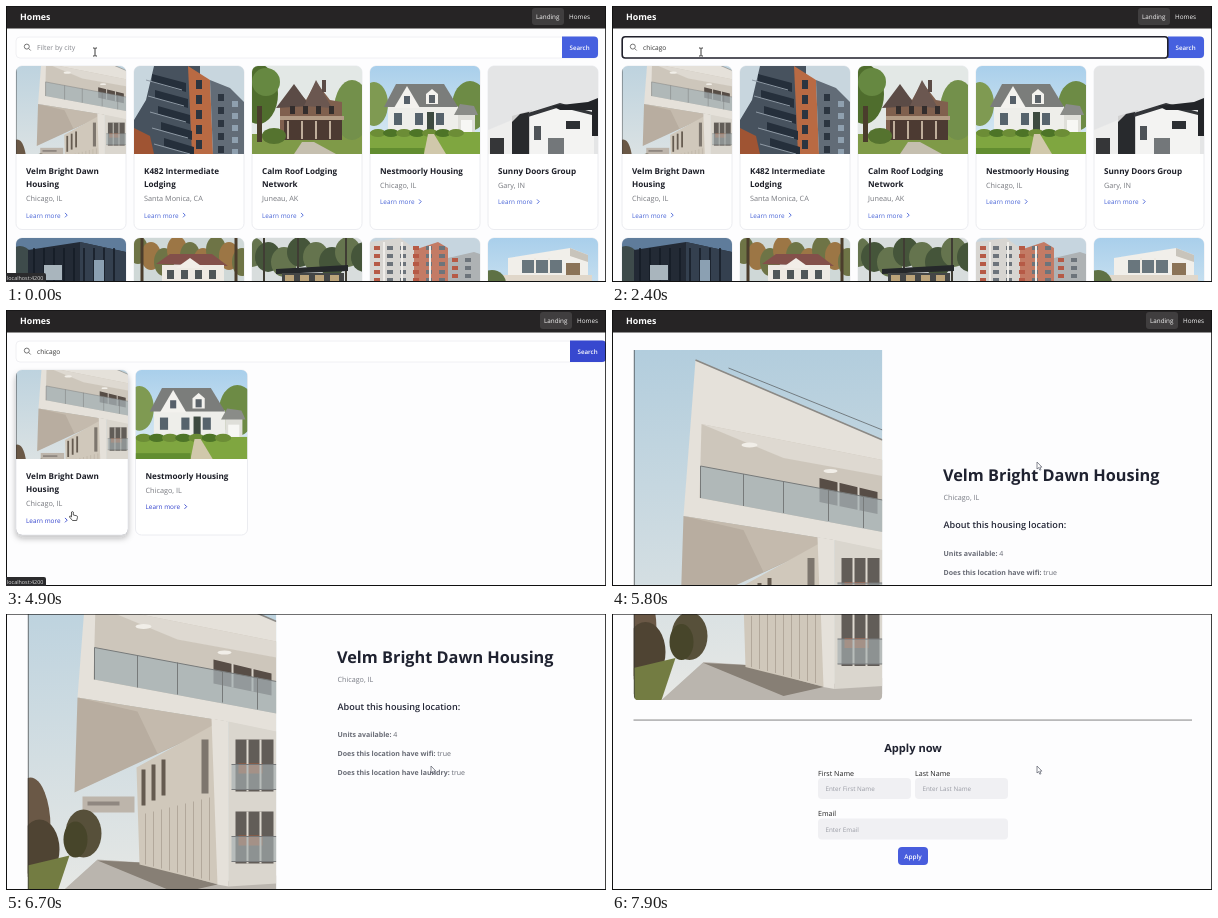
Write an HTML page that moves like this. It is 600 by 276 pixels and loops after 8 s.

```html
<!DOCTYPE html>
<html lang="en">
<head>
<meta charset="utf-8">
<title>Homes</title>
<style>
html, body { margin: 0; width: 100%; height: 100%; overflow: hidden; background: #fdfdfe; }
svg { display: block; }
text { font-family: "Open Sans", "Noto Sans", sans-serif; text-rendering: geometricPrecision; white-space: pre; }

.timed { animation: 8s step-end infinite; }
#list { animation-name: list; }
#results { animation-name: results; }
#detail { animation-name: detail; }
#status { animation-name: status; }
#ring { animation-name: ring; }
#hint { animation-name: hint; }
#beam { animation-name: beam; }
#hand, #lift { animation-name: hand; }
#arrow { animation-name: detail; }
#page { animation: scroll 8s infinite; }
#pointer { animation: pointer 8s infinite; }
.key { fill: transparent; animation: key 8s step-end infinite; animation-delay: calc(var(--i) * .2s); }

@keyframes list { 0% { visibility: visible } 36.25%, 100% { visibility: hidden } }
@keyframes results { 0% { visibility: hidden } 36.25% { visibility: visible } 63.75%, 100% { visibility: hidden } }
@keyframes detail { 0% { visibility: hidden } 63.75%, 100% { visibility: visible } }
@keyframes status {
  0% { visibility: visible } 5% { visibility: hidden }
  48.75% { visibility: visible } 68.75%, 100% { visibility: hidden }
}
@keyframes ring { 0% { opacity: 0 } 6.25%, 100% { opacity: 1 } }
@keyframes hint { 0% { opacity: 1 } 12.5%, 100% { opacity: 0 } }
@keyframes key { 0% { fill: transparent } 12.5% { fill: #333 } 37.5%, 100% { fill: transparent } }
@keyframes beam { 0% { visibility: visible } 38.75%, 100% { visibility: hidden } }
@keyframes hand { 0% { visibility: hidden } 38.75% { visibility: visible } 63.75%, 100% { visibility: hidden } }
@keyframes scroll {
  0% { transform: translateY(0) }
  73.75% { transform: translateY(0); animation-timing-function: steps(4) }
  78.75% { transform: translateY(-64px); animation-timing-function: steps(8) }
  88.75% { transform: translateY(-181px); animation-timing-function: steps(6) }
  96.25%, 100% { transform: translateY(-320px) }
}
@keyframes pointer {
  0% { transform: translate(89px, 46px) }
  37.5% { transform: translate(89px, 46px); animation-timing-function: steps(5) }
  43.75%, 47.5% { transform: translate(63px, 198px); animation-timing-function: steps(4) }
  52.5%, 65% { transform: translate(67px, 206px); animation-timing-function: steps(6) }
  72.5%, 100% { transform: translate(425px, 156px) }
}
</style>
</head>
<body>
<svg id="stage" width="600" height="276" viewBox="0 0 600 276"></svg>
<script>
const rect = (fill, x, y, w, h, rx = 0, more = "") =>
  `<rect x="${x}" y="${y}" width="${w}" height="${h}" rx="${rx}" fill="${fill}" ${more}/>`;
const poly = (fill, points, more = "") => `<polygon points="${points}" fill="${fill}" ${more}/>`;
const oval = (fill, cx, cy, rx, ry) => `<ellipse cx="${cx}" cy="${cy}" rx="${rx}" ry="${ry}" fill="${fill}"/>`;
const line = (stroke, d, w = 1) => `<path d="${d}" fill="none" stroke="${stroke}" stroke-width="${w}"/>`;
const text = (x, y, size, fill, weight, s, more = "") =>
  `<text x="${x}" y="${y}" font-size="${size}" fill="${fill}" font-weight="${weight}" ${more}>${s}</text>`;
const repeat = (n, f) => Array.from({ length: n }, (_, i) => f(i)).join("");
const grad = (id, a, b) => `<linearGradient id="${id}" x2="0" y2="1"><stop stop-color="${a}"/><stop offset="1" stop-color="${b}"/></linearGradient>`;

// Pictures: the first is tall, the others are 110 x 88.
const concrete = () =>
  rect("url(#haze)", 0, 0, 249, 366) +
  poly("#e5e1da", "62,10 249,90 249,210 200,190 50,166") +
  line("#8b8985", "M62 10L249 90", 1.5) + line("#55585a", "M95 18L249 80", .7) +
  poly("#cdc6bb", "68,74 249,110 249,182 66,148") +
  poly("#ded9d1", "68,74 249,110 249,126 150,108") +
  poly("#574d46", "186,128 244,142 244,164 186,152") + line("#d8d2c9", "M205 132V156M225 137V160", 2) +
  poly("#a7b3b7", "67,116 249,150 249,182 67,148", 'opacity=".75"') +
  line("#777a7a", "M67 116L249 150M67 116V148M110 124V156M150 131V163M195 140V171M230 146V178", 1) +
  oval("#f1eee8", 116, 95, 8, 2.5) + oval("#f1eee8", 197, 121, 7, 2) +
  poly("#b8ada0", "50,166 200,190 47,261") +
  poly("#c9c0b3", "50,166 200,190 130,222 110,180", 'opacity=".7"') +
  rect("#bdb5ab", 55, 265, 52, 16) + rect("#8f8780", 60, 270, 32, 4) +
  oval("#57503a", 56, 302, 18, 24) + oval("#47452a", 48, 308, 12, 18) +
  oval("#6a5846", 3, 296, 20, 50) + oval("#4f4433", 12, 318, 20, 30) +
  poly("#737c42", "0,334 42,324 28,366 0,366") +
  poly("#bab5ae", "28,366 70,328 115,331 190,351 249,344 249,366") +
  poly("#877f75", "70,329 112,331 190,353 150,362") +
  poly("#d0c8bb", "109,236 192,190 192,353 112,333") +
  repeat(9, i => line("#aaa093", `M${118 + i * 8} ${282 - i * 2}V${333 + i * 2}`, .8)) +
  repeat(3, i => rect("#655b50", 114 + i * 10, 238 - i * 5, 4, 36)) +
  rect("#7d766e", 174, 208, 7, 54) +
  poly("#e5e1da", "184,187 201,190 201,355 190,353") +
  poly("#dad6ce", "201,190 249,200 249,352 201,355") +
  [208, 280].map(y => rect("#625d58", 208, y, 38, 52) + rect("#a45a39", 211, y + 24, 24, 10) +
    line("#ded9d0", `M220 ${y}v52M233 ${y}v52`, 2) +
    rect("#a5afb1", 204, y + 25, 45, 25, 0, 'opacity=".65"') + line("#77797a", `M204 ${y + 25}h45M204 ${y + 50}h45`)).join("") +
  rect("#333", 0, 0, 1, 366);

const flats = () =>
  rect("#c8d6de", 0, 0, 110, 88) +
  poly("#47525e", "20,0 66,0 66,88 0,88 0,54 12,34") +
  poly("#b96a43", "54,0 76,14 79,88 58,88") +
  poly("#626c77", "76,14 96,22 110,36 110,88 79,88") +
  repeat(5, i => poly("#252f3b", `${18 + i * 3},${8 + i * 16} ${52 + i * 2},${17 + i * 16} ${52 + i * 2},${26 + i * 16} ${18 + i * 3},${16 + i * 16}`) +
    line("#8f9aa5", `M${12 + i * 2} ${14 + i * 16}l36 10`, 1)) +
  repeat(5, i => rect("#2c3540", 62, 14 + i * 15, 6, 9) + rect("#2c3540", 84, 28 + i * 13, 6, 7) + rect("#8fa0af", 98, 35 + i * 12, 6, 6)) +
  poly("#9f5433", "0,62 16,70 20,88 0,88");

const brick = () =>
  rect("#e3e8e6", 0, 0, 110, 88) + rect("#7f9a48", 0, 68, 110, 20) +
  oval("#73904b", 100, 44, 18, 30) +
  poly("#80604e", "28,40 42,22 54,34 64,16 78,34 90,36 90,74 28,74") +
  poly("#5b4b46", "24,42 42,18 58,40") + poly("#6b5750", "52,40 64,14 80,42") +
  rect("#5b4b46", 70, 14, 4, 12) + rect("#4c3a32", 32, 54, 58, 20) + rect("#b39c86", 28, 50, 64, 4) +
  repeat(4, i => rect("#bfae9b", 35 + i * 14, 55, 2, 18) + rect("#332d2c", 38 + i * 13, 40, 5, 8)) +
  poly("#c5bfaf", "50,76 62,76 84,88 42,88") +
  oval("#4f6d2d", 6, 28, 20, 30) + oval("#668841", 14, 16, 14, 14) + rect("#4a3d2c", 5, 40, 5, 36) + oval("#55732f", 22, 70, 12, 8);

const cottage = () =>
  rect("url(#clear)", 0, 0, 110, 88) + oval("#6d8b45", 100, 40, 18, 25) + oval("#7f9a52", 4, 38, 14, 22) +
  rect("#7fa640", 0, 66, 110, 22) +
  rect("#eeeeea", 18, 40, 70, 28) + poly("#7b7d7b", "14,41 26,18 74,18 88,41") +
  poly("#f3f2ee", "24,42 37,20 50,42") + poly("#f3f2ee", "56,38 56,28 62,23 68,28 68,38") +
  rect("#5a6268", 59, 29, 6, 8) + rect("#56606a", 34, 30, 6, 8) +
  repeat(3, i => rect("#56636c", 24 + i * 21, 47, 8, 12)) + rect("#3d4a40", 57, 46, 7, 20) +
  rect("#dfdfd9", 88, 48, 17, 18) + poly("#8a8c88", "84,49 90,38 104,40 108,49") + rect("#f7f7f4", 91, 54, 11, 12) +
  repeat(7, i => oval(i % 2 ? "#4d7427" : "#6c8d36", 8 + i * 13, 67, 8, 4)) +
  poly("#d0c8ab", "58,68 64,68 76,88 54,88") + rect("#628d30", 0, 82, 54, 6);

const cubes = () =>
  rect("#e4e5e6", 0, 0, 110, 88) +
  poly("#d1d1d1", "24,50 44,44 44,88 24,88") + poly("#282a2d", "24,56 32,48 41,46 41,88 24,88") +
  poly("#f3f3f2", "42,48 72,38 106,48 106,88 42,88") + poly("#333539", "40,47 72,37 108,47 108,50 72,41 40,51") +
  poly("#222428", "64,40 100,36 110,32 110,70 104,70 104,44 72,44") + poly("#eeeeed", "0,64 24,54 24,88 0,88") +
  rect("#4e5358", 46, 60, 7, 14) + rect("#2c2f33", 78, 55, 14, 8) + rect("#73777a", 60, 72, 16, 16) + rect("#353638", 2, 72, 14, 16);

const black = () =>
  rect("#5f7c9b", 0, 0, 110, 88) + oval("#3e4b4b", 4, 30, 16, 22) +
  poly("#232a35", "12,12 64,4 110,14 110,88 12,88") + poly("#34404f", "64,4 110,14 110,88 64,88") +
  repeat(9, i => line("#151b24", `M${18 + i * 10} 10V88`, 1.5)) + rect("#a9b5bd", 28, 27, 18, 15) + rect("#8ba0b2", 78, 22, 10, 24);

const bungalow = () =>
  rect("#cfd8d7", 0, 0, 110, 88) + repeat(9, i => oval(i % 2 ? "#9c7645" : "#6e7446", 4 + i * 13, 12 + i % 3 * 6, 10, 14)) +
  poly("#83504a", "22,26 36,16 78,16 94,28") + rect("#eeeae3", 28, 27, 62, 20) + poly("#f2eee8", "42,30 56,20 70,30") +
  repeat(4, i => rect("#4f5658", 33 + i * 14, 32, 7, 9)) + rect("#73863e", 0, 44, 110, 44) + line("#4b3d2c", "M8 0V50M102 0V46", 3);

const grove = () =>
  rect("#d8dddd", 0, 0, 110, 88) + repeat(8, i => oval(i % 2 ? "#45553a" : "#65744e", i * 16, 14 + i % 3 * 5, 13, 15)) +
  line("#403d34", "M12 0V44M46 0V40M94 0V44", 2) +
  poly("#25282a", "24,31 96,27 96,33 24,36") + rect("#444646", 30, 35, 62, 30) +
  repeat(4, i => rect("#bca47a", 33 + i * 15, 37, 9, 14)) + rect("#505e3b", 0, 48, 110, 40);

const towers = () =>
  rect("#c6d5df", 0, 0, 110, 88) + poly("#d7d5d1", "0,4 30,0 44,10 44,88 0,88") + poly("#c37b65", "44,12 68,4 78,10 78,88 44,88") +
  poly("#aeb2b4", "78,20 104,14 110,16 110,88 78,88") +
  repeat(7, i => repeat(8, j => rect(j % 3 ? "#6d747b" : "#b65a46", 4 + j * 13, 8 + i * 8 + (j > 5 ? 12 : 0), 6, 4))) +
  line("#efede9", "M14 4V88M32 4V88M60 8V88", 2);

const villa = () =>
  rect("url(#clear)", 0, 0, 110, 88) + poly("#f1efea", "20,20 82,10 100,17 100,88 20,88") + poly("#c8c4bb", "82,10 100,17 100,24 82,18") +
  rect("#69767d", 34, 22, 40, 13) + line("#eeeae2", "M47 20V36M61 20V36", 2) + rect("#e0d7ca", 8, 37, 96, 7) +
  rect("#8b7357", 78, 25, 14, 12) + oval("#5e7145", 4, 46, 14, 14);

const acme = "Velm Bright Dawn";
const homes = [
  [concrete, [acme, "Housing"], "Chicago, IL"],
  [flats, ["K482 Intermediate", "Lodging"], "Santa Monica, CA"],
  [brick, ["Calm Roof Lodging", "Network"], "Juneau, AK"],
  [cottage, ["Nestmoorly Housing"], "Chicago, IL"],
  [cubes, ["Sunny Doors Group"], "Gary, IN"],
  ...[black, bungalow, grove, towers, villa].map(p => [p, [], ""])
];

let clips = 0;
function photo(draw, x, y, w, h, box, radius) {
  const id = "clip" + clips++;
  return `<clipPath id="${id}">${rect("#000", x, y, w, h + radius, radius)}</clipPath><g clip-path="url(#${id})">` +
    `<svg x="${x}" y="${y}" width="${w}" height="${h}" viewBox="${box}" preserveAspectRatio="xMidYMid slice">${draw()}</svg></g>`;
}

function card([draw, lines, city], x, y, w, photoH, h, blue) {
  const top = y + photoH * 1.023 + 17.5, cityY = top + (lines.length - 1) * 13.5 + 14, more = cityY + 16.5;
  return rect("#fff", x, y, w, h, 6, 'stroke="#e6e7ec" stroke-width=".8"') +
    photo(draw, x, y, w, photoH, draw === concrete ? "0 80 249 199" : "0 0 110 88", 6) +
    lines.map((s, i) => text(x + 10, top + i * 13.5, 8.15, "#1d1f28", 700, s)).join("") +
    (city && text(x + 10, cityY, 7.3, "#77797f", 400, city) +
      text(x + 10, more, 6.4, blue, 500, "Learn more") + line(blue, `M${x + 49} ${more - 4.6}l2.2 2.2l-2.2 2.2`, .9));
}

// The bar's right side moves by 8 px when the scrollbar goes away.
const header = dx => rect("#262425", 0, 0, 600, 22.5) + text(14, 13.6, 8.8, "#fff", 700, "Homes") +
  rect("#403e3f", 526 + dx, 2, 32, 17, 3) + text(530 + dx, 12.6, 6.3, "#f4f4f4", 500, "Landing") + text(563 + dx, 12.6, 6.35, "#f4f4f4", 500, "Homes");

const search = (dx, blue, inner) => rect("#fff", 10, 31, 582 + dx, 21, 4, 'stroke="#ececf0" stroke-width=".8"') +
  `<path d="M${556 + dx} 30.5h32q4 0 4 4v13.5q0 4 -4 4h-32z" fill="${blue}"/>` +
  text(563.5 + dx, 43.8, 6.2, "#fff", 600, "Search") + inner +
  `<circle cx="20.8" cy="40.6" r="2.5" fill="none" stroke="#666" stroke-width=".9"/>` + line("#666", "M22.7 42.5l2 2", .9);

const group = (id, body) => `<g id="${id}" class="timed">${body}</g>`;
const typed = [..."chicago"].map((c, i) => `<tspan class="key" style="--i:${i}">${c}</tspan>`).join("");

const list = header(0) +
  search(0, "#4660df",
    `<rect id="ring" class="timed" x="10.2" y="30.7" width="545.6" height="21.3" rx="3" fill="none" stroke="#20202b" stroke-width="1.6"/>` +
    text(31, 43.8, 6.9, "#85878d", 400, "Filter by city", 'id="hint" class="timed"') +
    text(31, 43.8, 6.6, "#333", 400, typed)) +
  homes.map((h, i) => card(h, 10 + i % 5 * 118, i < 5 ? 60 : 232, 110, 88, 163.5, "#4763d6")).join("");

const results = header(8) + search(8, "#3748cf", text(31, 43.8, 6.6, "#333", 400, "chicago")) +
  `<rect id="lift" class="timed" x="10" y="61" width="112" height="164" rx="6" filter="url(#shadow)"/>` +
  card(homes[0], 10, 60, 112, 89, 165, "#3444cd") + card(homes[3], 129.5, 60, 112, 89, 165, "#3444cd");

const fact = (y, label, value) =>
  text(331.5, y, 7, "#686b75", 700, `${label} <tspan font-weight="400">${value}</tspan>`);
const field = (x, y, w, label) => text(x, y - 2.5, 7.1, "#222", 400, label) +
  rect("#f0f0f3", x, y, w, 21, 4) + text(x + 7.5, y + 13.3, 6.3, "#9a9ca5", 400, "Enter " + label);

const detail = `<g id="page">` + header(8) + photo(concrete, 21.5, 34, 249, 372, "0 -6 249 372", 0) +
  // round the lower corners of the picture
  `<path d="M21 400v7h7q-6.500 0-6.500-7zM271 400v7h-7q6.500 0 6.500-7z" fill="#fdfdfe"/>` +
  text(331, 171, 16.3, "#1f2230", 700, acme + " Housing") +
  text(331.5, 190, 7.2, "#777a83", 400, "Chicago, IL") +
  text(331.5, 218, 9.1, "#252838", 600, "About this housing location:") +
  fact(245.5, "Units available:", 4) + fact(264.5, "Does this location have wifi:", true) + fact(283.5, "Does this location have laundry:", true) +
  rect("#777", 21.5, 425.6, 558.5, .9) +
  text(301, 458, 11.1, "#1f2230", 700, "Apply now", 'text-anchor="middle"') +
  field(206, 484, 93, "First Name") + field(303, 484, 93, "Last Name") + field(206, 524.5, 190, "Email") +
  rect("#485ddd", 286, 553, 30, 18, 4) + text(301, 564.6, 6.4, "#fff", 600, "Apply", 'text-anchor="middle"') + `</g>`;

const outline = (d, color) => `<path d="${d}" fill="#fff" stroke="${color}" stroke-width=".8" stroke-linejoin="round"/>`;
const pointer = `<g id="pointer">` +
  group("beam", line("#222", "M-2 -4h1.500L0 -3.500L.5 -4H2M-2 4h1.500L0 3.500L.5 4H2M0 -3.500V3.500", .9)) +
  group("hand", outline("M-1.500 -4q1 -1 1.800 0v3l3.400 .8q1 .3 .8 1.500l-.8 3.200h-4.200l-3-3.500q0 -1.500 1.200 -.8l.8 .7z", "#333")) +
  group("arrow", outline("M0 -4V3l1.600 -1.400l1.200 2.600l1.200 -.6l-1.200 -2.500h2.100z", "#686b78")) + `</g>`;

document.getElementById("stage").innerHTML =
  `<defs>${grad("haze", "#b2cddd", "#e7e8e5")}${grad("clear", "#a9cfeb", "#e0edf3")}` +
  `<filter id="shadow" x="-20%" y="-20%" width="140%" height="140%"><feDropShadow dx="0" dy="3" stdDeviation="3" flood-color="#222" flood-opacity=".3"/></filter></defs>` +
  rect("#fdfdfe", 0, 0, 600, 276) +
  group("list", list) + group("results", results) + group("detail", detail) +
  rect("#111", 0, 0, 1, 276) + rect("#111", 599.2, 0, .8, 276) + rect("#111", 0, 275, 600, 1) + rect("#111", 0, 0, 600, .6) +
  group("status", `<path d="M0 267h38q2 0 2 2v7h-40z" fill="#2b2b2d"/>` + text(1, 273.8, 5.4, "#dcdcdc", 400, "localhost:4200")) +
  pointer;
</script>
</body>
</html>
```
